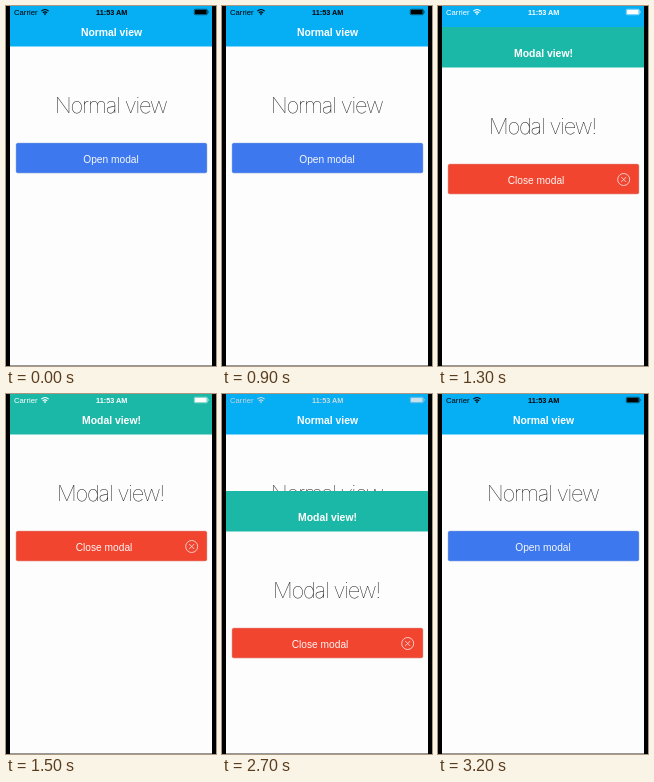
Write an HTML page that moves like this. It is 210 px wide and 360 px high and loops after 3.3 s.

```html
<!DOCTYPE html>
<html lang="en">
<head>
<meta charset="utf-8">
<title>Modal view</title>
<style>
  html, body { margin: 0; width: 100%; height: 100%; overflow: hidden; background: #000; }
  svg { display: block; }
  text { font-family: "Liberation Sans", Arial, sans-serif; text-anchor: middle; }
  .bar { font-size: 10.4px; font-weight: bold; fill: #fff; }
  .big { font: 100 22px Inter, sans-serif; letter-spacing: -1.2px; fill: #111; }
  .label { font-size: 10.2px; fill: #fff; fill-opacity: .95; }
  .button { stroke-width: .6; }
</style>
</head>
<body>
<svg width="210" height="360" viewBox="0 0 210 360">
  <defs>
    <g id="status">
      <text x="8" y="9" font-size="7.7" style="text-anchor:start">Carrier</text>
      <path d="M35.3 5.2Q39 1.8 42.7 5.2M36.8 6.8Q39 4.8 41.2 6.8" fill="none" stroke="currentColor" stroke-width="1.1"/>
      <path d="M37.7 7.8Q39 6.7 40.3 7.8L39 9.2Z"/>
      <text x="105.7" y="9" font-size="7.3" font-weight="bold">11:53 AM</text>
      <rect x="188.3" y="3.3" width="13" height="5.4" rx="1" fill="none" stroke="currentColor" stroke-width=".6"/>
      <rect x="189" y="4" width="11.6" height="4" rx=".5"/>
      <path d="M202 4.8q1.3 1.2 0 2.4z"/>
    </g>
  </defs>

  <g id="normal">
    <rect x="4" width="202" height="360" fill="#fdfdfd"/>
    <rect x="4" width="202" height="40.5" fill="#06aef4"/>
    <text class="bar" x="105.5" y="30">Normal view</text>
    <text class="big" x="104.7" y="107">Normal view</text>
    <rect class="button" x="10.3" y="137.3" width="190.4" height="29.5" rx="1.5" fill="#3d78ee" stroke="#3268d8"/>
    <text class="label" x="105" y="156.5">Open modal</text>
  </g>

  <g id="modal">
    <rect x="4" width="202" height="360" fill="#fdfdfd"/>
    <rect id="tint" x="4" width="202" height="40.5"/>
    <text class="bar" x="105.5" y="30">Modal view!</text>
    <text class="big" x="104.5" y="107">Modal view!</text>
    <rect class="button" x="10.3" y="137.3" width="190.4" height="29.5" rx="1.5" fill="#f1452f" stroke="#dc3f2b"/>
    <text class="label" x="98" y="156.5">Close modal</text>
    <g fill="none" stroke="#fff" stroke-width=".7">
      <circle cx="185.7" cy="152.5" r="6"/>
      <path d="M183.2 150l5 5m0-5l-5 5"/>
    </g>
  </g>

  <use id="dark" href="#status" fill="#000" color="#000"/>
  <use id="light" href="#status" fill="#fff" color="#fff"/>
  <path d="M4 359.5h202" stroke="#000" stroke-opacity=".4"/>
</svg>
<script>
  const LOOP = 3300, OPEN = 1038, CLOSE = 2641.5, HEIGHT = 360;
  const BLUE = [3, 169, 239], TEAL = [28, 184, 167];
  const $ = id => document.getElementById(id);
  const ramp = (t, from, to) => Math.min(1, Math.max(0, (t - from) / (to - from)));

  // Critically damped spring from 0 to 1, cut off once it has nearly settled
  function spring(ms) {
    const x = Math.max(0, ms) * .017;
    return Math.min(1, 1.004 * (1 - (1 + x) * Math.exp(-x)));
  }

  function draw(now) {
    const t = now % LOOP;
    const shown = t < CLOSE ? spring(t - OPEN) : 1 - spring(t - CLOSE);
    const y = Math.round(HEIGHT * (1 - shown));
    $("modal").setAttribute("transform", `translate(0 ${y})`);

    const mix = ramp(t, 1100, 1300);
    $("tint").setAttribute("fill", `rgb(${BLUE.map((c, i) => Math.round(c + (TEAL[i] - c) * mix))})`);

    const light = ramp(t, 1000, 1110) - ramp(t, CLOSE, 2900);
    $("light").setAttribute("opacity", light);
    $("dark").setAttribute("opacity", 1 - light);
  }

  const start = performance.now();
  function tick() {
    draw(performance.now() - start);
    requestAnimationFrame(tick);
  }
  tick();
</script>
</body>
</html>
```
